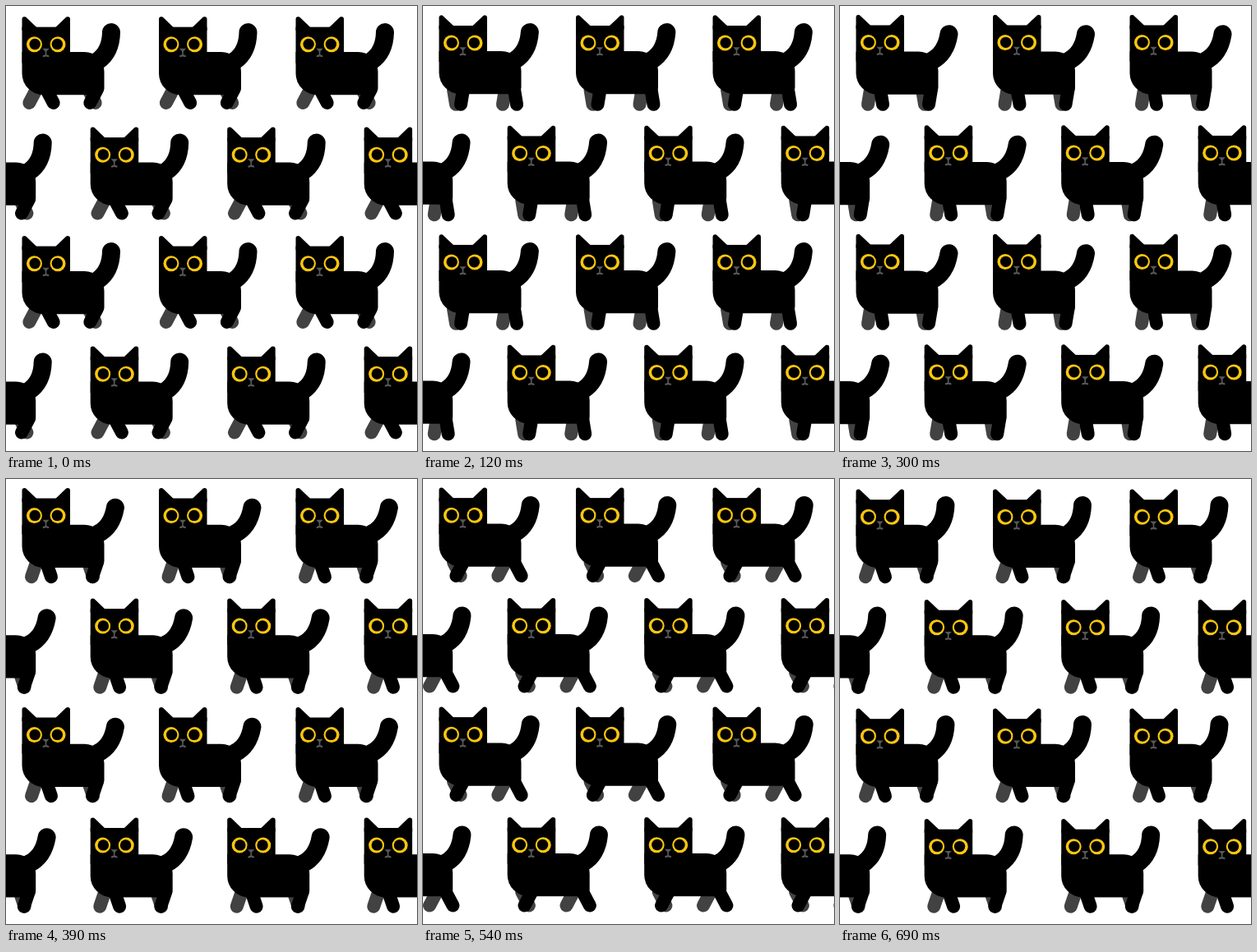
Animation of 500 by 542 pixels, one loop 720 ms. Source, as an HTML page with a canvas:

```html
<!DOCTYPE html>
<html lang="en">
<head>
<meta charset="utf-8">
<title>Walking cats</title>
<style>
  html, body { margin: 0; width: 100%; height: 100%; overflow: hidden; background: #fff; }
  canvas { display: block; }
</style>
</head>
<body>
<canvas id="stage" width="500" height="542"></canvas>
<script>
const ctx = document.getElementById('stage').getContext('2d');
const LOOP = 720, STEP = 30;
const BLACK = '#000', FAR = '#424242', NOSE = '#575757', EYE = '#fdc70f';

// Linear swing 0 -> 1 -> 0 over one period.
const swing = (t, period) => 1 - Math.abs(1 - 2 * (t % period) / period);

function disc(x, y, r, color) {
  ctx.fillStyle = color;
  ctx.beginPath();
  ctx.arc(x, y, r, 0, Math.PI * 2);
  ctx.fill();
}

function stroke(width, color, path) {
  ctx.lineWidth = width;
  ctx.strokeStyle = color;
  ctx.beginPath();
  path();
  ctx.stroke();
}

function leg(hipX, angle, color) {
  const hipY = 101.6, length = 18.5;
  stroke(16, color, () => {
    ctx.moveTo(hipX, hipY);
    ctx.lineTo(hipX + length * Math.sin(angle), hipY + length * Math.cos(angle));
  });
}

function torso() {
  ctx.fillStyle = BLACK;
  ctx.beginPath();
  ctx.roundRect(19.5, 56, 100, 52.2, [0, 24, 8, 26]);
  ctx.fill();
}

function tail(angle) {
  ctx.save();
  ctx.translate(110, 67);
  ctx.rotate(angle);
  stroke(22, BLACK, () => {
    ctx.moveTo(1.5, 0);
    ctx.quadraticCurveTo(17.5, -11, 18, -35);
  });
  ctx.restore();
}

function ear(side) {
  ctx.save();
  ctx.translate(48.75, 0);
  ctx.scale(side, 1);
  ctx.beginPath();
  ctx.moveTo(29.25, 30);
  ctx.arc(26.25, 16, 3, 0, -Math.PI * 0.74, true);
  ctx.lineTo(11.5, 26);
  ctx.lineTo(11.5, 30);
  ctx.fill();
  ctx.restore();
}

function head() {
  ctx.fillStyle = BLACK;
  ctx.fillRect(19.5, 25.6, 58.5, 44);
  ear(-1);
  ear(1);
  for (const side of [-1, 1]) {
    const x = 48.75 + side * 14.3;
    disc(x, 46.7, 9.5, EYE);
    disc(x - side * 0.7, 46.5, 6.7, BLACK);
  }
  ctx.fillStyle = NOSE;
  ctx.beginPath();
  ctx.moveTo(44.3, 51.8);
  ctx.lineTo(52.7, 51.8);
  ctx.lineTo(48.5, 56.2);
  ctx.fill();
  stroke(1.7, NOSE, () => {
    ctx.moveTo(48.5, 55);
    ctx.lineTo(48.5, 60);
  });
  stroke(2.3, NOSE, () => {
    ctx.moveTo(45.7, 61);
    ctx.quadraticCurveTo(48.5, 59.6, 51.3, 61);
  });
}

function cat(x, y, t) {
  const stride = swing(t, LOOP / 2), sway = swing(t, LOOP);
  const angle = (1 - 2 * stride) * 0.49;
  ctx.save();
  ctx.translate(x, y);
  leg(37, -angle, FAR);
  leg(100, angle, FAR);
  leg(49, angle, BLACK);
  leg(111, -angle, BLACK);
  ctx.translate(0, -1.5 * stride);
  torso();
  tail(0.16 * sway);
  ctx.translate(0, -2 * sway);
  head();
  ctx.restore();
}

function draw(now) {
  const t = Math.floor(now % LOOP / STEP) * STEP;
  ctx.fillStyle = '#fff';
  ctx.fillRect(0, 0, 500, 542);
  ctx.lineCap = 'round';
  for (let row = 0; row < 4; row++) {
    const odd = row % 2;
    for (let col = 0; col < 4; col++) {
      cat(col * 166.5 - odd * 83.3, row * 133.5 + odd, t);
    }
  }
}

const start = performance.now();
function tick() {
  draw(performance.now() - start);
  requestAnimationFrame(tick);
}
tick();
</script>
</body>
</html>
```
